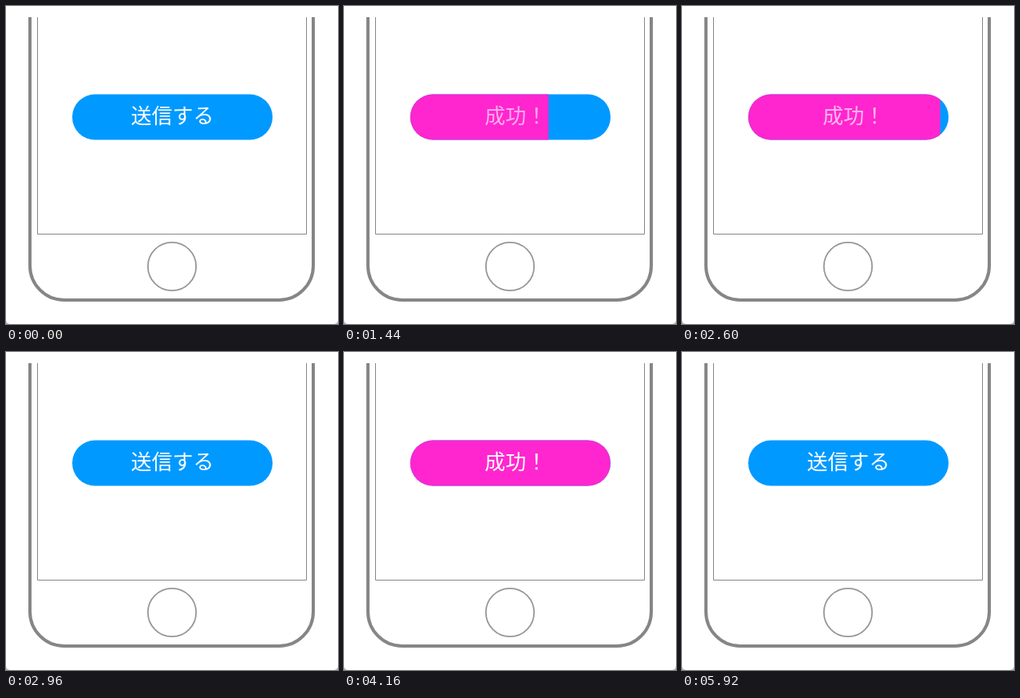
Animation of 416x398 px, one loop 6040 ms. Source, as an HTML page:

```html
<!DOCTYPE html>
<html lang="ja">
<head>
<meta charset="utf-8">
<title>送信ボタン</title>
<style>
  html, body { margin: 0; width: 100%; height: 100%; overflow: hidden; background: #fff; }
  svg { display: block; width: 416px; height: 398px; }
  text { font: 400 26px "Noto Sans CJK JP", "Noto Sans CJK", sans-serif; fill: #fff; }
</style>
</head>
<body>
<svg viewBox="0 0 416 398">
  <defs>
    <clipPath id="wipe"><rect id="edge" x="80" y="100" width="0" height="80"/></clipPath>
  </defs>

  <!-- window with rounded bottom corners -->
  <rect y="380" width="416" height="18" fill="#b4b4b4"/>
  <rect y="-20" width="416" height="418" rx="5" fill="#fff"/>

  <!-- phone -->
  <g fill="none" stroke="#868686">
    <path d="M30 14V325A43 43 0 0 0 73 368H342A43 43 0 0 0 385 325V14" stroke-width="4"/>
    <path d="M39.5 14V285.5H376.5V14"/>
    <circle cx="208" cy="326" r="30.2" stroke="#979797" stroke-width="1.8"/>
  </g>

  <!-- button -->
  <rect x="83" y="110.5" width="251" height="57" rx="28.5" fill="#0099ff"/>
  <g clip-path="url(#wipe)">
    <rect x="83" y="110.5" width="251" height="57" rx="28.5" fill="#ff26cf"/>
  </g>
  <text id="send" x="156.5" y="147">送信する</text>
  <text id="done" x="176.3" y="147" opacity="0">成功！</text>
</svg>
<script>
  const LOOP = 6040, STEP = 40, LEFT = 83, WIDTH = 251;

  // start, duration, filled afterwards
  const moves = [
    [1298, 350, true],
    [2580, 340, false],
    [3827, 350, true],
    [5180, 240, false]
  ];

  const $ = id => document.getElementById(id);
  const edge = $('edge'), send = $('send'), done = $('done');
  const clamp = v => Math.min(1, Math.max(0, v));

  // cubic-bezier(.25, .1, .25, 1)
  function ease(x) {
    if (x <= 0 || x >= 1) return clamp(x);
    let lo = 0, hi = 1;
    for (let i = 0; i < 24; i++) {
      const s = (lo + hi) / 2;
      if (0.75 * s * (1 - s) + s ** 3 < x) lo = s; else hi = s;
    }
    const s = lo, r = 1 - s;
    return 0.3 * s * r * r + 3 * s * s * r + s ** 3;
  }

  function draw(time) {
    const t = Math.floor(time % LOOP / STEP) * STEP;
    let p = 1, on = false;
    for (const [start, length, filled] of moves) {
      if (t >= start) {
        p = clamp((t - start) / length);
        on = filled;
      }
    }
    const fill = on ? ease(p) : 1 - ease(p);
    edge.setAttribute('width', LEFT - 80 + WIDTH * fill);
    edge.style.display = fill > 0.002 ? '' : 'none';

    // the old label leaves before the new one comes in
    const leaving = clamp(1 - p / 0.18), coming = clamp((p - 0.2) / 0.33);
    send.setAttribute('opacity', on ? leaving : coming);
    done.setAttribute('opacity', on ? coming : leaving);
  }

  const begin = performance.now();
  function tick() {
    draw(performance.now() - begin);
    requestAnimationFrame(tick);
  }
  draw(0);
  requestAnimationFrame(tick);
</script>
</body>
</html>
```
